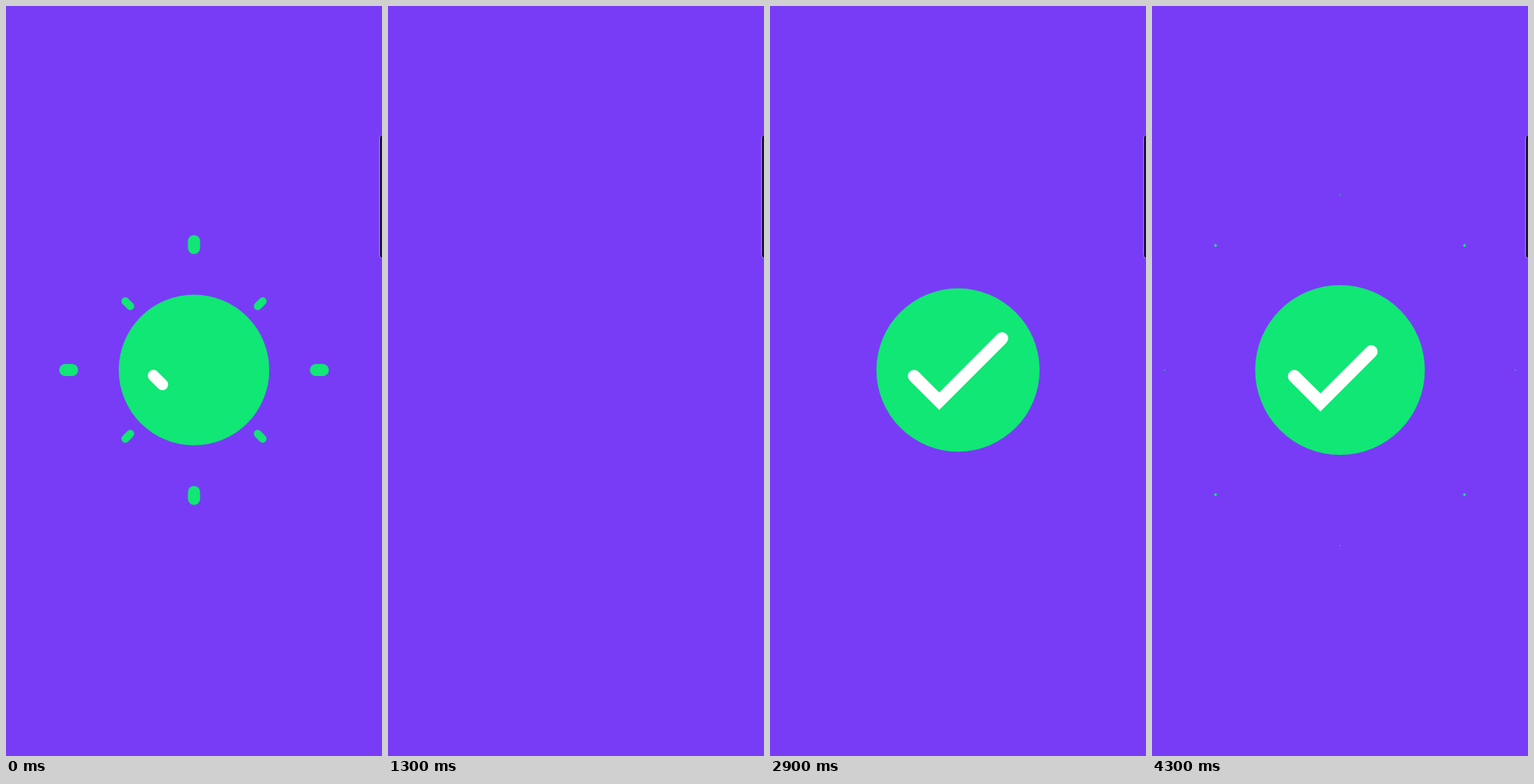
Write an HTML page with a canvas that moves like this. It is 530 px wide and 1056 px high and loops after 4.4 s.

```html
<!DOCTYPE html>
<html>
<head>
<meta charset="utf-8">
<style>
  html, body { margin: 0; height: 100%; overflow: hidden; background: #783cf7; }
  canvas { display: block; }
</style>
</head>
<body>
<canvas id="stage" width="530" height="1056"></canvas>
<script>
const ctx = document.getElementById('stage').getContext('2d');
const LOOP = 4400, CYCLE = 2000, LEAD = 114, HIDE = 1364;
const GREEN = '#10e774';
const CHECK_LENGTH = 175.4;

const clamp = x => Math.min(1, Math.max(0, x));
const easeOut = x => 1 - (1 - clamp(x)) ** 3;
const smooth = x => { x = clamp(x); return x * x * (3 - 2 * x); };

function drawEdge() {
  ctx.beginPath();
  ctx.roundRect(526.5, 181, 30, 174.5, 5);
  ctx.fillStyle = '#1d1138';
  ctx.fill();
  ctx.strokeStyle = '#a78fdc';
  ctx.lineWidth = 1;
  ctx.stroke();
}

// Four radial capsules that fly outwards, swell and shrink away.
function drawSparks(angle, distance, size, stretch, age, life) {
  if (age >= life) return;
  const width = size * Math.sin(Math.PI * age / life);
  const length = width * (1 + stretch * (1 - age / life));
  ctx.fillStyle = GREEN;
  for (let i = 0; i < 4; i++) {
    ctx.save();
    ctx.rotate(angle + i * Math.PI / 2);
    ctx.beginPath();
    ctx.roundRect(distance - length / 2, -width / 2, length, width, width / 2);
    ctx.fill();
    ctx.restore();
  }
}

function drawBadge(age) {
  const scale = 1.08 * easeOut((age - 7) / 228) - 0.08 * smooth((age - 235) / 359);
  ctx.scale(scale, scale);
  ctx.beginPath();
  ctx.arc(0, 0, 115, 0, 2 * Math.PI);
  ctx.fillStyle = GREEN;
  ctx.fill();

  const progress = smooth(age / 555);
  ctx.beginPath();
  ctx.moveTo(-62, 8.5);
  ctx.lineTo(-26.5, 44);
  ctx.lineTo(62, -44.5);
  ctx.setLineDash(progress < 1 ? [progress * CHECK_LENGTH + 0.01, 400] : []);
  ctx.lineCap = 'round';
  ctx.strokeStyle = '#fff';
  ctx.lineWidth = 17.4;
  ctx.stroke();
}

function draw(time) {
  const age = (time % LOOP + LEAD) % CYCLE;
  ctx.fillStyle = '#783cf7';
  ctx.fillRect(0, 0, 530, 1056);
  drawEdge();
  if (age > 7 && age < HIDE) {
    ctx.save();
    ctx.translate(265, 512.5);
    drawSparks(0, 247 * easeOut(age / 336), 22.8, 0.77, age, 425);
    drawSparks(Math.PI / 4, 249.5 * easeOut((age - 4) / 500), 15.4, 1.2, age, 450);
    drawBadge(age);
    ctx.restore();
  }
}

const start = performance.now();
function tick() {
  draw(performance.now() - start);
  requestAnimationFrame(tick);
}
tick();
</script>
</body>
</html>
```
